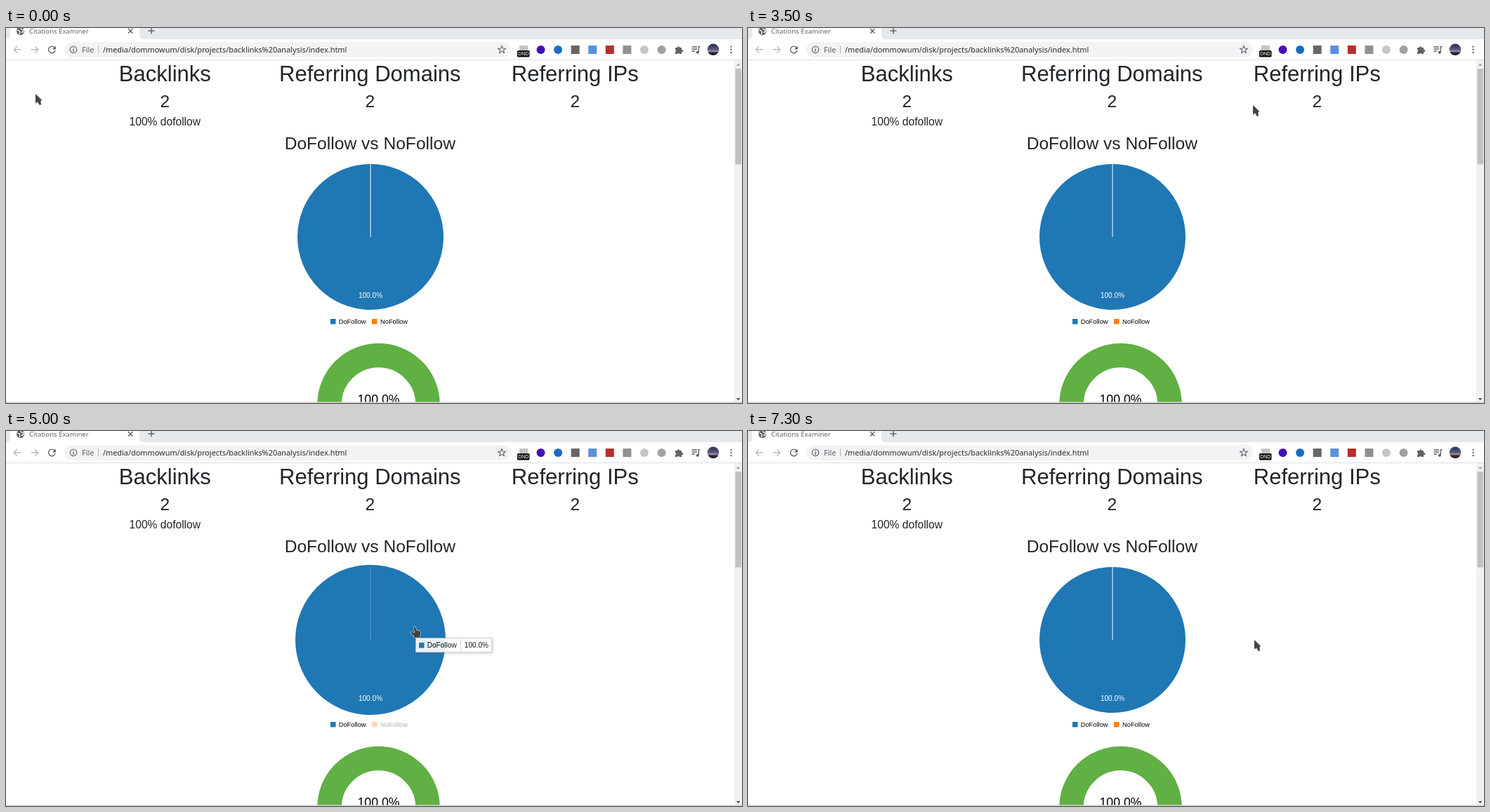
Animation, 1048 px wide and 535 px high, one loop 8 s. Source, as an HTML page:

```html
<!DOCTYPE html>
<html lang="en">
<head>
<meta charset="utf-8">
<title>Citations Examiner</title>
<style>
  html, body { margin: 0; width: 100%; height: 100%; overflow: hidden; background: #fff; }
  svg { display: block; width: 1048px; height: 535px; }
  .page { font-family: "Liberation Sans", Arial, sans-serif; fill: #212529; text-anchor: middle; }
  .chart { font-family: "Liberation Sans", Arial, sans-serif; fill: #000; }
  .ui { font-family: "Noto Sans", sans-serif; fill: #5f6368; }
  .line { fill: none; stroke: #5f6368; stroke-width: 1.4; }
  .thin { stroke-width: 1.1; }
  .faint { stroke: #b9bbbe; }
  .h1 { font-size: 31px; }
  .h2 { font-size: 24.6px; }
  .small { font-size: 15.6px; }
  .key { font-size: 9.33px; }
  .mid { text-anchor: middle; }
  .light { fill: #fff; }
  .cursor { fill: #444; stroke: #fff; stroke-width: 1.2; stroke-opacity: .75; paint-order: stroke; stroke-linejoin: round; }
  #tip { font-size: 10.1px; }
  #box { filter: drop-shadow(1.5px 1.5px 2px rgba(90, 90, 90, .35)); }
</style>
</head>
<body>
<svg viewBox="0 0 1048 535" xmlns="http://www.w3.org/2000/svg">
  <defs>
    <linearGradient id="dusk" x1="0" y1="0" x2="0" y2="1">
      <stop offset="0" stop-color="#252a52"/>
      <stop offset=".5" stop-color="#5b5a86"/>
      <stop offset=".65" stop-color="#b58f98"/>
      <stop offset=".75" stop-color="#2a2b42"/>
      <stop offset="1" stop-color="#171a2c"/>
    </linearGradient>
  </defs>
  <rect width="1048" height="535" fill="#fff"/>

  <!-- tab strip -->
  <rect width="1048" height="16" fill="#e6e9ec"/>
  <path d="M0 16Q6 16 6 10V0H190V10Q190 16 196 16Z" fill="#fff"/>
  <circle cx="20.5" cy="4.5" r="5.5" fill="#5f6368"/>
  <path d="M16 3l3 1 1 2-1 3M21 0l1 2 3 1-1 3-2 0" fill="none" stroke="#fff" stroke-width="1.3"/>
  <text class="ui" x="33" y="8" font-size="9.6">Citations Examiner</text>
  <path class="line" d="M174 1l6.4 6.4M180.4 1l-6.4 6.4M202.5 4h9M207-1v9.5"/>

  <!-- toolbar -->
  <path class="line faint" d="M21.5 30.8h-10M16 26l-4.8 4.8 4.8 4.8M35.500 30.8h10M41 26l4.8 4.8-4.8 4.8"/>
  <path class="line" d="M69.3 28.2A4.8 4.8 0 1 0 70 32"/>
  <path d="M70.8 25.5v5h-5Z" fill="#5f6368"/>
  <rect x="83" y="20" width="636" height="22" rx="11" fill="#f1f3f4"/>
  <circle class="line thin" cx="96" cy="30.8" r="4.8"/>
  <path class="line" d="M96 30v3.7M96 27.800v1.3"/>
  <g class="ui" font-size="10.92">
    <text x="108" y="34.5">File</text>
    <text x="485.4" y="34.5" text-anchor="end" fill="#2d3034">/media/dommowum/disk/projects/backlinks%20analysis/index.html</text>
  </g>
  <path d="M131.5 25v11.5" stroke="#b4b7ba"/>
  <path id="star" class="line thin"/>
  <rect x="731" y="25" width="12" height="8" fill="#c4c4c4"/>
  <rect x="728" y="32" width="17.5" height="9.5" rx="1.5" fill="#111"/>
  <text class="chart light mid" x="736.8" y="39.3" font-size="7">DND</text>
  <g id="chips"></g>
  <path d="M953 28h3a1.7 1.7 0 1 1 3.4 0H962v3a1.7 1.7 0 1 1 0 3.2V37h-3a1.6 1.6 0 0 0-3 0h-3v-3a1.6 1.6 0 0 0 0-3Z" fill="#5f6368"/>
  <path class="line" d="M976.500 27h7.5M976.500 30h7.5M976.500 33h4.500M986.300 34.500v-7.800h2.200"/>
  <circle cx="984.8" cy="34.8" r="2" fill="#5f6368"/>
  <circle cx="1007" cy="30.800" r="8.300" fill="url(#dusk)"/>
  <path d="M1032.500 26.600v9" stroke="#5f6368" stroke-width="2.400" stroke-linecap="round" stroke-dasharray="0 4.200"/>
  <rect y="45" width="1048" height="1" fill="#dcdfe2"/>

  <!-- page -->
  <g class="page">
    <g id="heads"></g>
    <text class="h2" x="518.300" y="172.500">DoFollow vs NoFollow</text>
    <text class="small" x="226.300" y="139">100% dofollow</text>
  </g>
  <circle id="pie" cx="519" cy="298" fill="#1f77b4"/>
  <path id="cut" d="M519 193.500V298" stroke="#fff"/>
  <g class="chart">
    <text class="light mid" x="519" y="385" font-size="10.1">100.0%</text>
    <rect x="462" y="415" width="7.500" height="7.500" fill="#1f77b4"/>
    <text class="key" x="473.700" y="422">DoFollow</text>
    <g id="other">
      <rect x="521" y="415" width="7.500" height="7.500" fill="#ff7f0e"/>
      <text class="key" x="533" y="422">NoFollow</text>
    </g>
    <circle cx="530.500" cy="537" r="70" fill="none" stroke="#60b044" stroke-width="34.500"/>
    <text class="mid" x="530.500" y="536" font-size="17.7">100.0%</text>
  </g>

  <!-- scrollbar and lower edge -->
  <rect x="1037" y="46" width="11" height="488" fill="#f1f1f1"/>
  <rect x="1038.500" y="58" width="8.500" height="136.500" fill="#c1c1c1"/>
  <path d="M1039.800 53.800h5.600l-2.800-3.200Z" fill="#a0a0a0"/>
  <path d="M1039.800 528h5.600l-2.800 3.200Z" fill="#505050"/>
  <rect y="533.500" width="1048" height="1.500" fill="#d2d4d6"/>

  <g id="tip" class="chart" opacity=".9">
    <rect id="box" x=".5" y=".5" width="108" height="20" fill="#fff" stroke="#ccc"/>
    <path d="M64.500 1v19" stroke="#ccc"/>
    <rect x="5" y="7" width="7.500" height="7.500" fill="#1f77b4"/>
    <text x="16.700" y="14.200">DoFollow</text>
    <text x="69.800" y="14.200">100.0%</text>
  </g>
  <path id="arrow" class="cursor" d="M0 0V13.500L3 11.500 6 16.300 8 15 7.300 10.800 9 8.800Z"/>
  <path id="hand" class="cursor" d="M-1.500 1.200Q-.5-.8 1 1L2.600 5.200 6.600 6.200Q8.400 6.800 8.200 9L7.300 15.700H-.8L-1.200 13.200-5.700 9.600Q-6 7.600-3.600 8L.2 9Z"/>
</svg>
<script>
  const LOOP = 8000, STEP = 100, ENTER = 4800, LEAVE = 7100, RADIUS = 104;
  const $ = id => document.getElementById(id);

  // pointer strokes: start time, end time, end point
  const home = [42, 94];
  const strokes = [
    [0, 100, 42, 96], [800, 1000, 55, 98],
    [1100, 1600, 166, 128], [1600, 2000, 244, 132], [2000, 2400, 295, 143],
    [2800, 2900, 500, 104], [2900, 3800, 828, 113],
    [4000, 4200, 796, 148], [4200, 4600, 614, 248],
    [4700, 5000, 582, 279], [5100, 5500, 575, 290],
    [6600, 6900, 581, 289], [7000, 7300, 721, 298]
  ];

  const ramp = (t, from, to) => Math.min(1, Math.max(0, (t - from) / (to - from)));

  function pointer(t) {
    let [x, y] = home;
    for (const [from, to, px, py] of strokes) {
      const u = ramp(t, from, to);
      x += (px - x) * u;
      y += (py - y) * u;
    }
    return [Math.round(x), Math.round(y)];
  }

  function place(id, x, y, shown) {
    $(id).setAttribute("transform", `translate(${x} ${y})`);
    $(id).style.display = shown ? "" : "none";
  }

  function draw(time) {
    const t = Math.floor(time % LOOP / STEP) * STEP;
    const [x, y] = pointer(t);
    const over = t >= ENTER && t < LEAVE;
    place("arrow", x, y, !over);
    place("hand", x, y, over);
    place("tip", x + 1, y + 16, over);

    // the slice overshoots a little, then settles
    const swell = over ? 3 + 2 * Math.exp((ENTER - t) / 50) : 0;
    $("pie").setAttribute("r", RADIUS + swell);
    const focus = ramp(t, ENTER - STEP, ENTER + 2 * STEP) - ramp(t, LEAVE - STEP, LEAVE + 2 * STEP);
    for (const id of ["cut", "other"]) $(id).setAttribute("opacity", 1 - .7 * focus);
  }

  function build() {
    const star = Array.from({ length: 10 }, (_, i) => {
      const r = i % 2 ? 2.4 : 5.6, a = i * Math.PI / 5;
      return [706 + r * Math.sin(a), 31 - r * Math.cos(a)].join(" ");
    });
    $("star").setAttribute("d", "M" + star.join("L") + "Z");

    const round = ["#4310b8", "#1a6bc4", "#c3c5c7", "#a0a0a0"];
    const colors = ["#4310b8", "#1a6bc4", "#666", "#5b8fe0", "#b5302a", "#8f9295", "#c3c5c7", "#a0a0a0"];
    $("chips").innerHTML = colors.map((c, i) =>
      `<rect x="${755.5 + 24.57 * i}" y="25" width="12" height="12" rx="${round.includes(c) ? 6 : 0}" fill="${c}"/>`
    ).join("");

    $("heads").innerHTML = ["Backlinks", "Referring Domains", "Referring IPs"].map((name, i) => {
      const x = 226.3 + 292 * i;
      return `<text class="h1" x="${x}" y="75.500">${name}</text><text class="h2" x="${x}" y="112.500">2</text>`;
    }).join("");
  }

  build();
  const start = performance.now();
  function tick() {
    draw(performance.now() - start);
    requestAnimationFrame(tick);
  }
  tick();
</script>
</body>
</html>
```
